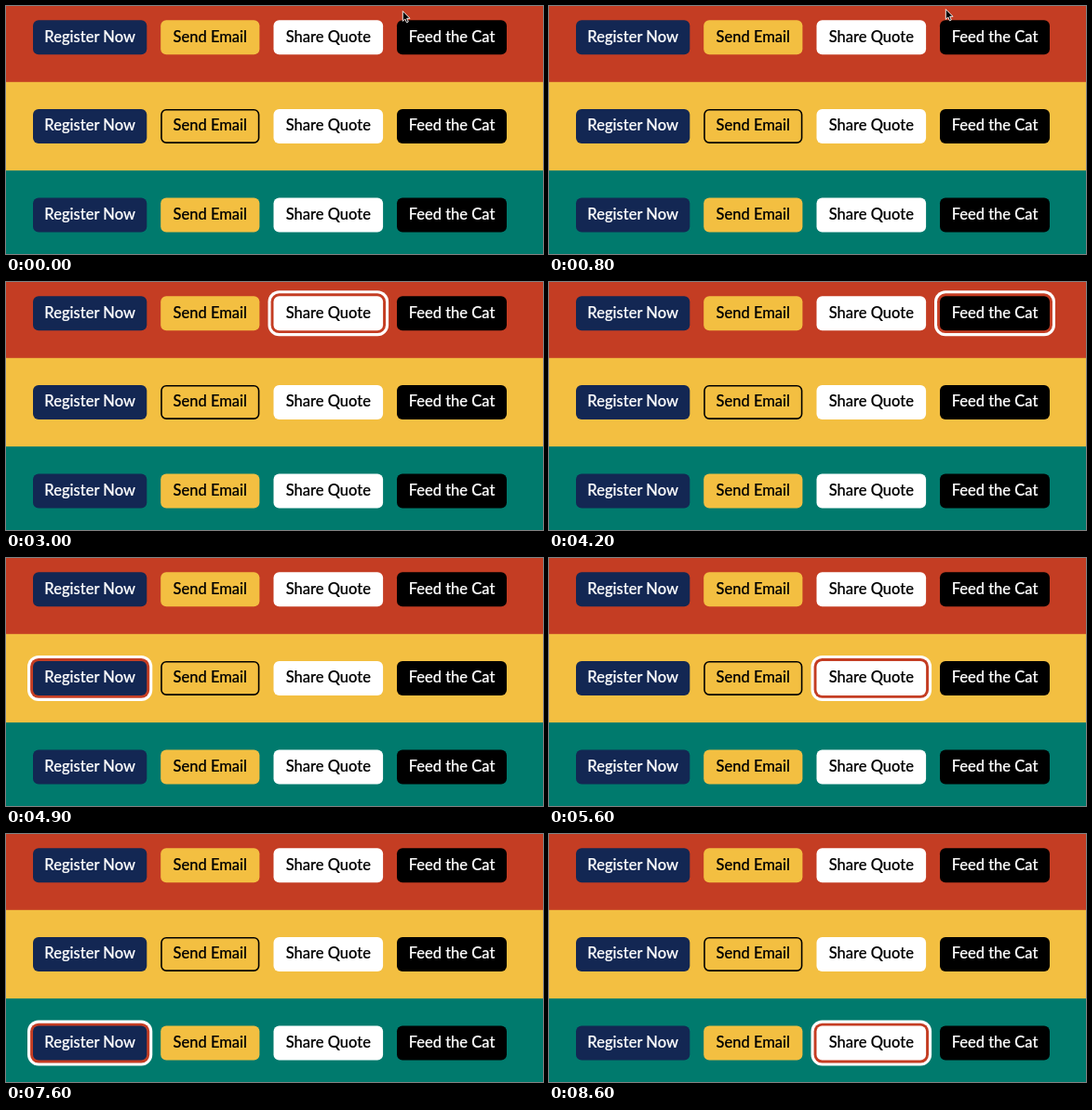
An HTML page for the animation above (8.7 s loop, 577 by 267 pixels).

```html
<!DOCTYPE html>
<html lang="en">
<head>
<meta charset="utf-8">
<title>Button focus rings</title>
<style>
  html, body { margin: 0; width: 100%; height: 100%; overflow: hidden; }
  svg { display: block; width: 577px; height: 267px; }
  text {
    font: 500 16.5px Lato, "Open Sans", sans-serif;
    text-anchor: middle;
    stroke-width: .2px;
  }
</style>
</head>
<body>
<svg id="stage" viewBox="0 0 577 267"></svg>
<script>
const RED = '#c43d23', YELLOW = '#f3bf41', TEAL = '#007a6d', NAVY = '#132753';
const LOOP = 8700;
const BUTTON_HEIGHT = 37, RADIUS = 6;
const FIRST_ROW = 15.2, ROW_PITCH = 95.7;

const bands = [
  { y: 0, height: 82, color: RED },
  { y: 81.8, height: 96, color: YELLOW },
  { y: 177.1, height: 90, color: TEAL }
];
const buttons = [
  { label: 'Register Now', x: 29, width: 122.3, fill: NAVY, ink: '#fff' },
  { label: 'Send Email', x: 166.2, width: 106.2, fill: YELLOW, ink: '#000' },
  { label: 'Share Quote', x: 287.5, width: 117.6, fill: '#fff', ink: '#000' },
  { label: 'Feed the Cat', x: 420, width: 118, fill: '#000', ink: '#fff' }
];
// Time at which each successive button receives focus.
const focusTimes = [1400, 2100, 2800, 3500, 4300, 5000, 5500, 6200, 7000, 7700, 8300];

const stage = document.getElementById('stage');

function add(parent, tag, attributes) {
  const node = document.createElementNS('http://www.w3.org/2000/svg', tag);
  for (const key in attributes) node.setAttribute(key, attributes[key]);
  return parent.appendChild(node);
}

function addBox(parent, button, y, grow, attributes) {
  return add(parent, 'rect', {
    x: button.x - grow, y: y - grow,
    width: button.width + 2 * grow, height: BUTTON_HEIGHT + 2 * grow,
    rx: RADIUS + grow, ...attributes
  });
}

for (const { y, height, color } of bands) {
  add(stage, 'rect', { x: 0, y, width: 577, height, fill: color });
}

const rings = [];
bands.forEach((band, row) => {
  const y = FIRST_ROW + row * ROW_PITCH;
  for (const button of buttons) {
    const ring = add(stage, 'g', { visibility: 'hidden' });
    addBox(ring, button, y, 6, { fill: '#fff' });
    addBox(ring, button, y, 2.9, { fill: RED });
    rings.push(ring);

    addBox(stage, button, y, 0, { fill: button.fill });
    if (button.fill === band.color) {
      addBox(stage, button, y, -.8, { fill: 'none', stroke: '#000', 'stroke-width': 1.6 });
    }
    add(stage, 'text', {
      x: button.x + button.width / 2, y: y + 23.3,
      fill: button.ink, stroke: button.ink
    }).textContent = button.label;
  }
});

const cursor = add(stage, 'path', {
  d: 'M0 0V10.8L2.5 8.5L4.2 12.3L6 11.5L4.4 7.8H7.7Z',
  fill: '#000', stroke: '#fff', 'stroke-width': .9
});

function draw(now) {
  const time = now % LOOP;
  const focused = focusTimes.filter(start => time >= start).length - 1;
  rings.forEach((ring, i) => ring.setAttribute('visibility', i === focused ? 'visible' : 'hidden'));

  // The pointer settles, then hides on the first key press.
  const drift = Math.min(1, Math.max(0, (time - 100) / 500));
  cursor.setAttribute('transform', `translate(426.3 ${5.5 - 2 * drift})`);
  cursor.setAttribute('visibility', focused < 0 ? 'visible' : 'hidden');
}

const begin = performance.now();
function tick() {
  draw(performance.now() - begin);
  requestAnimationFrame(tick);
}
tick();
</script>
</body>
</html>
```
